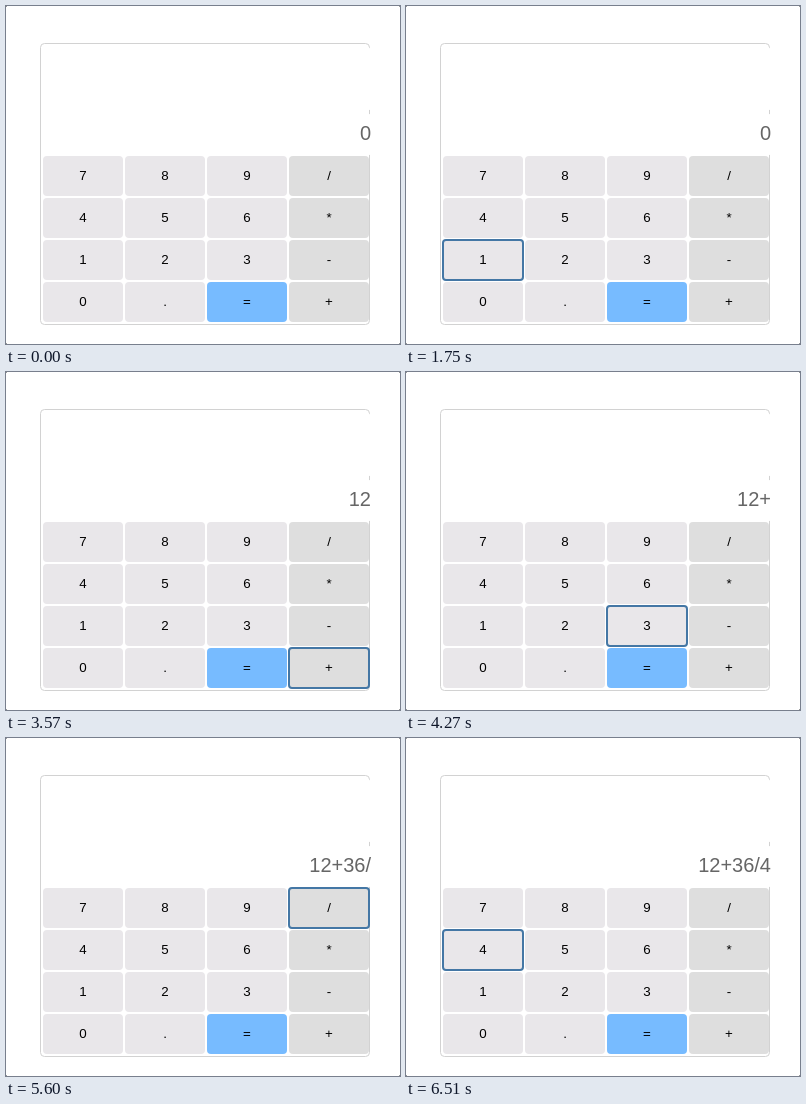
An HTML page that plays this animation: 394x338 px, repeating every 8 s.

```html
<!DOCTYPE html>
<html lang="en">
<head>
<meta charset="utf-8">
<title>Calculator</title>
<style>
  html, body { margin: 0; width: 100%; height: 100%; overflow: hidden; background: #fff; }
  svg { display: block; font-family: "Liberation Sans", Arial, sans-serif; }
  .key { font-size: 13.33px; text-anchor: middle; fill: #000; }
  #display { font-size: 20px; text-anchor: end; fill: #666; }
</style>
</head>
<body>
<svg width="394" height="338" viewBox="0 0 394 338">
  <path d="M0 0h1v1h-1zM393 0h1v1h-1zM0 337h1v1h-1zM393 337h1v1h-1z" fill="#999"/>
  <rect x="34.5" y="37.5" width="329" height="281" rx="4" fill="#fff" stroke="#d2d2d2"/>
  <rect x="36" y="42" width="330" height="62" rx="3" fill="#fff"/>
  <rect x="36" y="108" width="330" height="41" rx="3" fill="#fff"/>
  <g id="keys"></g>
  <rect id="ring" width="80" height="40" rx="3" fill="none" stroke="#4477a5" stroke-width="2"/>
  <text id="display" x="365" y="134"></text>
</svg>
<script>
const LOOP = 8000;
const LABELS = "789/456*123-0.=+";

// [key, time it takes focus, time the display follows]
const PRESSES = [
  ["1", 1750, 1890],
  ["2", 2520, 2590],
  ["+", 3570, 3640],
  ["3", 4270, 4410],
  ["6", 4900, 4970],
  ["/", 5530, 5600],
  ["4", 6370, 6510]
];

const $ = id => document.getElementById(id);
const keyPos = i => [37 + 82 * (i % 4), 150 + 42 * Math.floor(i / 4)];
const keyColor = (label, i) =>
  label === "=" ? "#77bbff" : i % 4 === 3 ? "#dedede" : "#e9e7ea";

$("keys").innerHTML = [...LABELS].map((label, i) => {
  const [x, y] = keyPos(i);
  return `<rect x="${x}" y="${y}" width="80" height="40" rx="4" fill="${keyColor(label, i)}"/>
    <text class="key" x="${x + 40}" y="${y + 24}">${label}</text>`;
}).join("");

function draw(t) {
  const focused = PRESSES.filter(p => t >= p[1]).pop();
  const typed = PRESSES.filter(p => t >= p[2]).map(p => p[0]).join("");
  $("display").textContent = typed || "0";
  $("ring").setAttribute("visibility", focused ? "visible" : "hidden");
  if (focused) {
    const [x, y] = keyPos(LABELS.indexOf(focused[0]));
    $("ring").setAttribute("x", x);
    $("ring").setAttribute("y", y);
  }
}

const start = performance.now();
function tick() {
  draw((performance.now() - start) % LOOP);
  requestAnimationFrame(tick);
}
tick();
</script>
</body>
</html>
```
